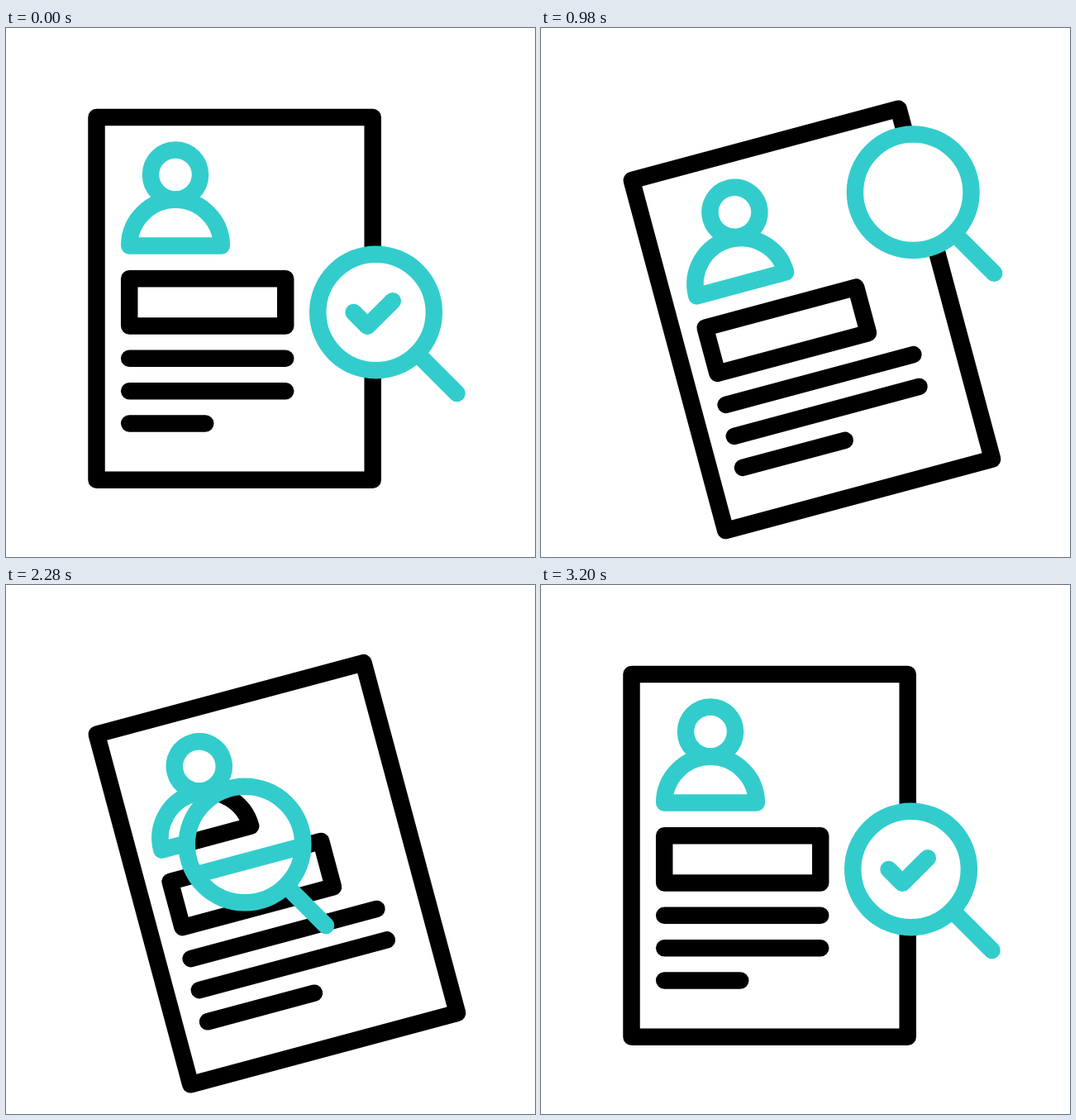
Animation, 640 px wide and 640 px high, one loop 3.42 s. Source, as an HTML page with a canvas:

```html
<!DOCTYPE html>
<html lang="en">
<head>
<meta charset="utf-8">
<title>Profile check</title>
<style>
  html, body { margin: 0; width: 100%; height: 100%; overflow: hidden; background: #fff; }
  canvas { display: block; }
</style>
</head>
<body>
<canvas id="stage" width="640" height="640"></canvas>
<script>
const ctx = document.getElementById('stage').getContext('2d');
const LOOP = 3420, STEP = 20;
const INK = '#000', TEAL = '#3cc';
const PAGE = { x: 276.5, y: 327.3 };

// Keys are [time, value] pairs, eased in and out between neighbours.
const turnKeys = [[0, 0], [340, -15], [2620, -15], [2940, 0]];
const xKeys = [[0, PAGE.x], [360, 327.8], [2640, 327.8], [3000, PAGE.x]];
const yKeys = [[0, PAGE.y], [360, 314.6], [960, 353], [1560, 314.6],
               [2160, 353], [2760, 316.3], [3100, PAGE.y]];
const swayKeys = [[400, 0], [1000, 1], [1600, -1], [2200, 1], [2800, 0]];
const tickKeys = [[0, 1], [360, 0], [2840, 0], [3200, 1]];

// Lens path around a centre: [time, degrees, radius]
const ORBIT = { x: 380.5, y: 270 };
const orbitKeys = [[0, 47.8, 99.8], [640, -5.65, 101.5], [1320, -88.5, 98],
                   [1800, -144.9, 100.8], [2280, -205.7, 101.5],
                   [2640, -258.6, 98.9], [3200, -312.2, 99.8]];

function eased(keys, t) {
  if (t <= keys[0][0]) return keys[0][1];
  const i = keys.findIndex(k => k[0] > t);
  if (i < 0) return keys[keys.length - 1][1];
  const [t0, a] = keys[i - 1], [t1, b] = keys[i];
  const u = (t - t0) / (t1 - t0);
  return a + (b - a) * u * u * (3 - 2 * u);
}

// Smooth curve through the keys, at rest at both ends.
function spline(keys, t, col) {
  const last = keys.length - 1;
  if (t >= keys[last][0]) return keys[last][col];
  const slope = i => i === 0 || i === last ? 0 :
    (keys[i + 1][col] - keys[i - 1][col]) / (keys[i + 1][0] - keys[i - 1][0]);
  const i = keys.findIndex(k => k[0] > t);
  const span = keys[i][0] - keys[i - 1][0];
  const u = (t - keys[i - 1][0]) / span, s = u * u * (3 - 2 * u);
  return keys[i - 1][col] * (1 - s) + keys[i][col] * s
    + span * u * (1 - u) * (slope(i - 1) * (1 - u) - slope(i) * u);
}

function stroke(color, trace) {
  ctx.strokeStyle = color;
  ctx.beginPath();
  trace();
  ctx.stroke();
}

const polyline = points => points.forEach(p => ctx.lineTo(...p));
const circle = (x, y, r) => ctx.arc(x, y, r, 0, Math.PI * 2);

function placePage(t) {
  ctx.translate(eased(xKeys, t), eased(yKeys, t));
  ctx.rotate(eased(turnKeys, t) * Math.PI / 180);
  ctx.translate(-PAGE.x, -PAGE.y);
}

function drawContent(t, main, accent) {
  ctx.save();
  placePage(t);
  stroke(accent, () => circle(205 + 15 * eased(swayKeys, t), 177.5, 30));
  stroke(accent, () => {
    ctx.arc(205, 263.6, 55.8, Math.PI, 0);
    ctx.closePath();
  });
  stroke(main, () => ctx.rect(149.2, 303.2, 189, 57.3));
  [189, 189, 92].forEach((length, i) => {
    const y = 399.8 + 39.4 * i;
    const end = 149.2 + length + 46 * eased(swayKeys, t - 80 * i);
    stroke(main, () => polyline([[149.2, y], [end, y]]));
  });
  ctx.restore();
}

function drawLens(t) {
  const angle = spline(orbitKeys, t, 1) * Math.PI / 180;
  const r = spline(orbitKeys, t, 2);
  const x = ORBIT.x + r * Math.cos(angle), y = ORBIT.y + r * Math.sin(angle);

  // The content seen through the glass swaps its two colours.
  ctx.save();
  ctx.beginPath();
  circle(x, y, 70);
  ctx.clip();
  ctx.fill();
  drawContent(t, TEAL, INK);
  ctx.restore();

  ctx.save();
  ctx.translate(x, y);
  stroke(TEAL, () => circle(0, 0, 70.3));
  stroke(TEAL, () => polyline([[51, 51], [98, 98]]));
  const tick = eased(tickKeys, t);
  if (tick > 0) {
    ctx.setLineDash([68 * tick, 200]);
    stroke(TEAL, () => polyline([[-27, 0], [-10.3, 16.8], [20.3, -13.8]]));
  }
  ctx.restore();
}

function draw(t) {
  ctx.fillStyle = '#fff';
  ctx.fillRect(0, 0, 640, 640);
  ctx.lineWidth = 20.5;
  ctx.lineCap = ctx.lineJoin = 'round';
  ctx.save();
  placePage(t);
  stroke(INK, () => ctx.rect(109.5, 108, 334.2, 438.7));
  ctx.restore();
  drawContent(t, INK, TEAL);
  drawLens(t);
}

const start = performance.now();
function tickFrame() {
  const t = (performance.now() - start) % LOOP;
  draw(Math.floor(t / STEP) * STEP);
  requestAnimationFrame(tickFrame);
}
tickFrame();
</script>
</body>
</html>
```
